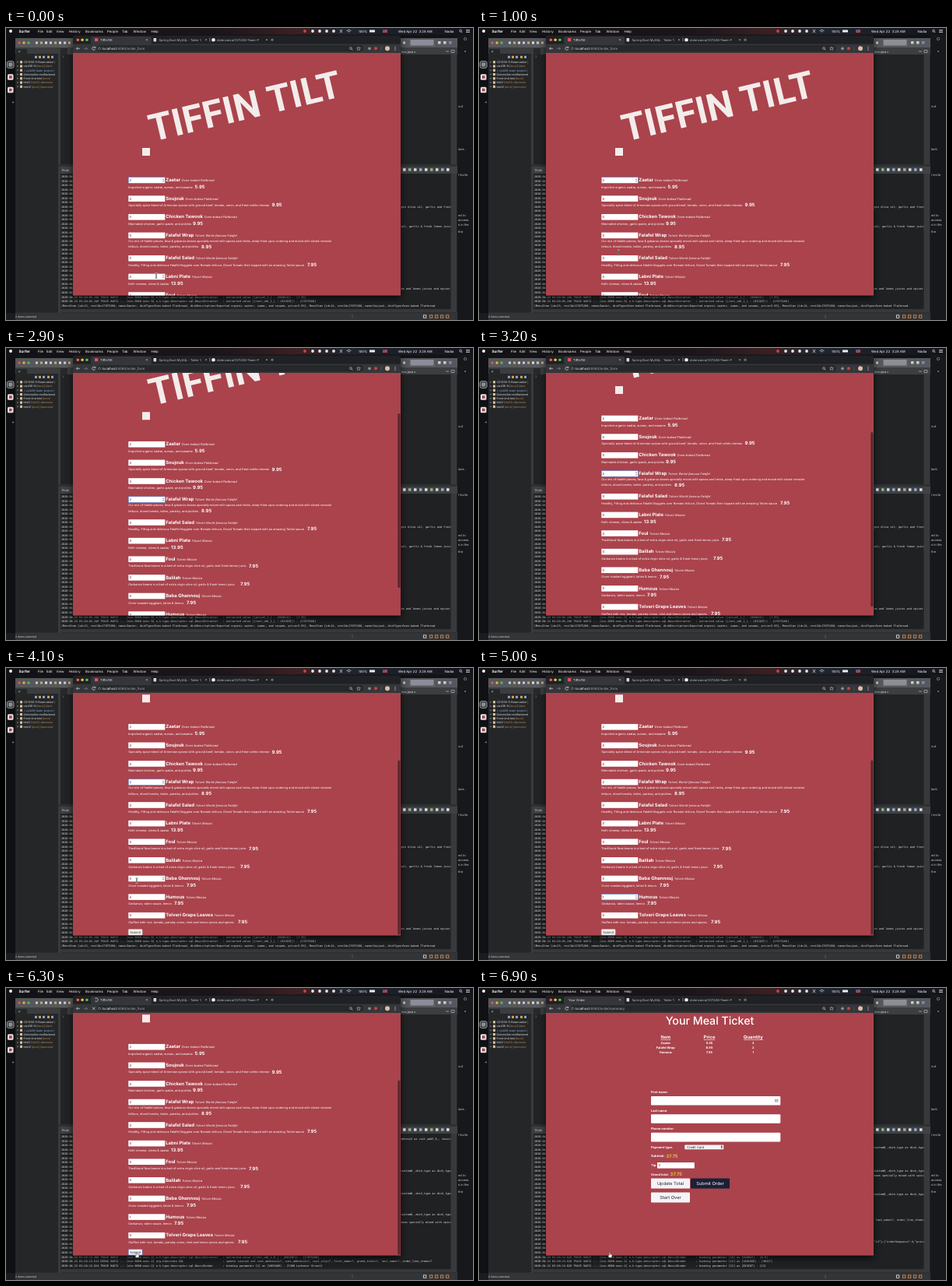
An HTML page that plays this animation: 600x375 px, repeating every 7000 ms.

```html
<!DOCTYPE html>
<html lang="en">
<head>
<meta charset="utf-8">
<title>Order form</title>
<style>
html, body { margin: 0; width: 100%; height: 100%; overflow: hidden; background: #0b0b0e; }
svg { display: block; width: 600px; height: 375px; font-family: Inter, "Open Sans", sans-serif; text-rendering: geometricPrecision; }
text { white-space: pre; }
.mono { font-family: "DejaVu Sans Mono", monospace; }
.logo { font-family: Roboto, sans-serif; font-weight: 600; }
.window { filter: drop-shadow(0 4px 5px rgba(0, 0, 0, .65)); }
</style>
</head>
<body>
<svg id="stage" viewBox="0 0 600 375" xmlns="http://www.w3.org/2000/svg"></svg>
<script>
const esc = s => String(s).replace(/&/g, '&amp;').replace(/</g, '&lt;');
const rect = (x, y, w, h, fill, more = '') => `<rect x="${x}" y="${y}" width="${w}" height="${h}" fill="${fill}" ${more}/>`;
const dot = (x, y, r, fill, more = '') => `<circle cx="${x}" cy="${y}" r="${r}" fill="${fill}" ${more}/>`;
const text = (x, y, s, size, fill = '#fff', more = '') => `<text x="${x}" y="${y}" font-size="${size}" fill="${fill}" ${more}>${esc(s)}</text>`;
const line = (d, color, w = 0.7) => `<path d="${d}" fill="none" stroke="${color}" stroke-width="${w}"/>`;
const group = (id, body, more = '') => `<g id="${id}" ${more}>${body}</g>`;
const bold = 'font-weight="700"';
const mid = 'text-anchor="middle"';
const RED = '#aa434c';

// name, kind, description, price, price x
const FLAT = 'Oven-baked Flatbread', WORLD = 'Tolveri World-famous Falafel', MEZZA = 'Tolveri Mezza';
const dishes = [
  ['Zaatar', FLAT, 'Imported organic zaatar, sumac, and sesame', '5.95', 242.5],
  ['Soujouk', FLAT, 'Specialty spice blend of Armenian spices with ground beef, tomato, onion, and fresh white cheese', '9.95', 341.5],
  ['Chicken Tawook', FLAT, 'Marinated chicken, garlic paste, and pickles', '9.95', 240],
  ['Falafel Wrap', WORLD, 'lettuce, diced tomato, tahini, parsley, and pickles.', '8.95', 251],
  ['Falafel Salad', WORLD, 'Healthy, Filling and delicious Falafel Nuggets over Romain lettuce, Diced Tomato then topped with an amazing Tahini sauce', '7.95', 387],
  ['Labni Plate', MEZZA, 'Kefir cheese, olives & zaatar.', '13.95', 212],
  ['Foul', MEZZA, 'Traditional fava beans in a bed of extra virgin olive oil, garlic and fresh lemon juice.', '7.95', 312],
  ['Balilah', MEZZA, 'Garbanzo beans in a bed of extra virgin olive oil, garlic & fresh lemon juice.', '7.95', 301],
  ['Baba Ghannouj', MEZZA, 'Oven-roasted eggplant, tahini & lemon.', '7.95', 232],
  ['Humous', MEZZA, 'Garbanzo, tahini sauce, lemon.', '7.95', 216],
  ['Tolveri Grape Leaves', MEZZA, 'Stuffed with rice, tomato, parsley onion, mint and lemon juices and spices.', '7.95', 298]
];
const WRAP = 3, HUMOUS = 9;
const longLine = 'Our mix of falafel pieces, fava & gabanzo beans specially mixed with spices and herbs, deep-fried upon ordering and mixed with sliced romaine';
const dishY = i => 195.2 + i * 23.62 + (i > WRAP ? 5.8 : 0);

function dish([name, kind, desc, price, px], i) {
  const y = dishY(i), dy = y + (i === WRAP ? 16.4 : 10.4);
  return rect(157.3, y - 3.5, 47, 7.6, '#fff', `id="box${i}" stroke-width=".6"`) +
    rect(158.2, y - 2.4, 3.2, 5.2, '#a9c8f2', `id="sel${i}"`) +
    text(158.4, y + 1.9, 0, 4.2, '#333', `id="val${i}"`) +
    `<path id="spin${i}" d="M201 ${y - 0.5}l1-1.5l1 1.5zM201 ${y + 1.1}l1 1.5l1-1.5z" fill="#666"/>` +
    `<text x="205.2" y="${y + 2}" font-size="5.95" fill="#fff" ${bold}>${name}<tspan dx="1.5" font-size="3.95" font-weight="400" font-style="italic">${kind}</tspan></text>` +
    (i === WRAP ? text(157.3, y + 8.7, longLine, 3.85) : '') +
    text(157.3, dy, desc, 3.9) + text(px, dy + 0.2, price, 5.9, '#fff', bold);
}

function menuPage() {
  return rect(175, 154, 10, 10, '#f3ecea') +
    text(0, 0, 'TIFFIN TILT', 48.5, '#f3ecea', 'class="logo" transform="translate(188 146) rotate(-13.4)"') +
    dishes.map(dish).join('') +
    rect(157.3, 455.4, 17.8, 7.4, '#f5f5f5', 'id="submit" rx="1" stroke-width=".7"') +
    text(166.2, 460.7, 'Submit', 4.2, '#222', mid);
}

function ticketPage() {
  const cols = [239.8, 296, 352.3];
  const row = (cells, y, size, more = '') => cells.map((c, i) => text(cols[i], y, c, size, '#fff', `${bold} ${mid} ${more}`)).join('');
  const label = (s, y) => text(221, y, s, 4, '#fff', bold);
  const field = (s, y) => label(s, y) + rect(221, y + 3.6, 166.3, 11.6, '#fff', 'rx="1"');
  const button = (x, y, s, bg, fg) => rect(x, y, 50, 13, bg, 'rx="1"') + text(x + 25, y + 8.5, s, 5.7, fg, mid);
  return text(296.5, 47, 'Your Meal Ticket', 14.2, '#fff', `font-weight="500" ${mid}`) +
    row(['Item', 'Price', 'Quantity'], 65.2, 5.9, 'text-decoration="underline"') +
    row(['Zaatar', '5.95', '2'], 72, 3.95) +
    row(['Falafel Wrap', '8.95', '2'], 77.8, 3.95) +
    row(['Humous', '7.95', '1'], 83.5, 3.95) +
    field('First name:', 135.3) + field('Last name:', 158.6) + field('Phone number:', 182.2) +
    rect(380, 142.8, 4.4, 3.6, '#a8a8ac', 'rx=".5"') + line('M381 144h2.4M381 145.3h2.4', '#fff', 0.4) +
    label('Payment type:', 205.6) + rect(264.3, 201.4, 50, 5.8, '#f4f4f4', 'rx=".8"') +
    text(267, 205.7, 'Credit Card', 4.1, '#222') +
    '<path d="M310.6 203.8l1.2-1.7l1.2 1.7zM310.6 204.6l1.2 1.7l1.2-1.7z" fill="#333"/>' +
    label('Subtotal:', 217.2) + text(240.2, 217.8, '37.75', 5.9, '#e7c936', bold) +
    label('Tip:', 229.2) + rect(229, 224, 47.8, 7.6, '#fff') + text(230.5, 229.4, '0', 4.2, '#333') +
    label('Grand total:', 240.8) + text(245.6, 241.4, '37.75', 5.9, '#e7c936', bold) +
    button(221, 244.5, 'Update Total', '#f4f4f6', '#22242c') +
    button(272, 244.5, 'Submit Order', '#1b2036', '#fff') +
    button(221, 262.5, 'Start Over', '#f4f4f6', '#22242c');
}

// three console states: stamped bottom lines and the tails of long lines at right
const log = (time, level, exec, cls, msg) => `2020-04-22 03:${time} ${level} 94672 --- [nio-8080-exec-${exec}] ${cls.padEnd(40)} : ${msg}`;
const SQL = 'o.h.type.descriptor.sql.Basic';
const tail = 'nuitem0_.dish_type as dish_type4_0_';
const consoles = [
  { last: [
      log('20:05.246', 'TRACE', 9, SQL + 'Extractor', 'extracted value ([price5_1_] : [DOUBLE]) - [7.95]'),
      log('20:05.246', 'TRACE', 9, SQL + 'Extractor', 'extracted value ([rest_id6_1_] : [BIGINT]) - [17075260]'),
      '[MenuItem [id=13, restId=17075260, name=Zaatar, dishType=Oven-baked Flatbread, dishDescription=Imported organic zaatar, sumac, and sesame, price=5.95], MenuItem [id=14, restId=17075260, name=Soujouk, dishType=Oven-baked Flatbread'],
    tails: [[230, 'gin olive oil, garlic and fresh lemon'], [255, 'oil, garlic & fresh lemon juice.'], [335, 'on and lemon juices and spices.']] },
  { last: [
      log('28:13.266', 'TRACE', 2, SQL + 'Extractor', 'extracted value ([rest_id6_1_0_] : [BIGINT]) - [17075260]'),
      log('28:13.613', 'DEBUG', 2, 'org.hibernate.SQL', 'update session set cust_address1=?, cust_address2=?, cust_city=?, first_name=?, grand_total=?, last_name=?, order_line_items=?'),
      log('28:13.624', 'TRACE', 2, SQL + 'Binder', 'binding parameter [1] as [VARCHAR] - [5300 Larkmoor Street]')],
    tails: [[194, 'ddress2 as cust_add3_0_, sessio'], [235, tail], [264, tail], [291, tail], [301, 'eans specially mixed with spices']] },
  { last: [
      log('28:13.626', 'TRACE', 2, SQL + 'Binder', 'binding parameter [10] as [DOUBLE] - [0.0]'),
      log('28:13.626', 'TRACE', 2, SQL + 'Binder', 'binding parameter [12] as [VARCHAR] - [40417]'),
      log('28:13.626', 'TRACE', 2, SQL + 'Binder', 'binding parameter [13] as [BIGINT] - [12]')],
    tails: [[205, tail], [235, tail], [241, 'eans specially mixed with spices'], [265, tail], [298, ' last_name=?, order_line_items=?'], [326, '"i3"},{"orderSequence":4,"price']] }
];
const mono = (x, y, s) => text(x, y, s, 3.49, '#e4e4e4', 'class="mono"');
const consoleText = ({ last, tails }) => last.map((s, i) => mono(71, 346.6 + i * 5.5, s)).join('') +
  tails.map(([y, s]) => mono(507.5, y + 1, s)).join('');

function desktop() {
  let s = rect(0, 0, 600, 375, '#121316') + rect(0, 9, 12, 366, '#101114') + rect(580, 9, 20, 366, '#17181b');
  // chat window edges
  s += rect(1.5, 42.8, 8.5, 8.5, 'none', 'rx="2" stroke="#ddd" stroke-width=".8"') + rect(3, 44.3, 5.5, 5.5, '#8b8d92', 'rx="1"');
  [63, 79.5].forEach(y => s += rect(2, y - 3.7, 7.5, 7.5, '#e6e2e2', 'rx="1.5"') + rect(4, y - 1.8, 3.6, 3.6, '#a8444e'));
  s += text(9, 97, '+', 6, '#aaa', mid);
  [[102, 'out'], [157, 'lack.'], [190, 'l invite'], [242, 'ed to'], [248, 'access'], [254, 's in the'], [263, 'the']]
    .forEach(([y, w]) => s += text(581, y, w, 4, '#c9cacc'));
  s += dot(590, 14, 1.6, 'none', 'stroke="#aaa" stroke-width=".6"') + line('M589 29l2 2m0-2l-2 2', '#999', 0.6);
  // editor window
  s += rect(12, 13, 568, 362, '#2c2d2f', 'rx="2"') + rect(12, 13, 568, 12, '#56585b') + rect(12, 25, 568, 9, '#3b3d40');
  ['#e2574c', '#e5b33d', '#5cb657'].forEach((c, i) => s += dot(17 + i * 6, 19, 1.7, c));
  for (let i = 0; i < 8; i++) s += rect(38 + i * 6, 17.5, 3, 3, ['#c3ced9', '#c4ad70', '#dddddd'][i % 3]);
  s += rect(510, 17.5, 3, 3, '#c2c5c8') + rect(519.5, 15, 30, 7.5, '#8b8e98');
  [555, 562, 569].forEach((x, i) => s += rect(x, 17, 3.5, 3.5, i === 2 ? '#6b8fc0' : '#c8cacd'));
  s += rect(12, 26, 55, 339, '#252628') + rect(12, 26, 55, 7, '#3a3c3e') + rect(13, 27, 14, 6, '#252628') + text(16, 31.5, 'P', 4, '#ccc');
  [37, 42, 47, 53, 58].forEach((x, i) => s += rect(x, 35.8, 3, 3, i % 2 ? '#d0a54b' : '#90a8c4'));
  ['CST438-3-Reservation [', 'cst438-3t [boot] [devt', '> cst438-team-project [', 'DeliveryServiceBackend', 'Front-end test [boot]', 'hib01 [hib01] [devtools', 'hib02 [boot] [devtools]']
    .forEach((w, i) => {
      const y = 43.8 + i * 5.25, cut = w.indexOf('[');
      const name = cut < 0 ? w : w.slice(0, cut), note = cut < 0 ? '' : w.slice(cut);
      s += `<path d="M14.5 ${y - 1}l1.5 1l-1.5 1z" fill="#aaa"/>` + rect(18, y - 1.6, 3, 3.2, '#d8c296') +
        `<text x="22.5" y="${y + 1.2}" font-size="3.5" fill="${i === 2 ? '#82aee0' : '#e2e2e2'}">${esc(name)}<tspan fill="#b98a50">${note}</tspan></text>`;
    });
  s += rect(67, 26, 3, 340, '#3a3b3d') + rect(70, 26, 510, 149, '#222325') + rect(70, 26, 510, 8, '#3c3e41') + rect(70, 26, 9, 8, '#27292c');
  s += text(508, 31.6, 'tion.java ×', 3.8, '#ddd') + text(72, 38, '1', 3.5, '#888', 'class="mono"') + line('M565 30h4M572 28.5h4v3h-4z', '#ccc', 0.6);
  s += rect(67, 175, 513, 3, '#2f3032') + rect(70, 178, 510, 9, '#3f4143') + text(72, 184, 'Probl', 3.6, '#ddd');
  for (let i = 0; i < 9; i++) s += rect(510 + i * 7, 180.2, 3.5, 3.5, ['#dde0e4', '#8fb58b', '#d5d8dc', '#8fabd0'][i % 4]);
  s += rect(70, 187, 510, 178, '#202123');
  for (let y = 192; y < 345; y += 5.5) s += mono(71, y.toFixed(1), '2020-04-22');
  s += '<clipPath id="logClip"><rect x="70" y="187" width="509" height="178"/></clipPath>' +
    '<g clip-path="url(#logClip)">' + consoles.map((c, i) => group('log' + i, consoleText(c))).join('') + '</g>';
  s += rect(571.5, 34, 7.5, 141, '#38393b') + rect(571.5, 187, 7.5, 178, '#38393b') + rect(70, 361, 502, 4, '#37383a');
  s += rect(12, 366, 568, 9, '#333436') + rect(0, 366, 12, 9, '#1b1c1f') + text(12, 371.6, '0 items selected', 3.5, '#d0d0d0');
  s += line('M445 368v5', '#777', 0.5);
  [538, 546, 553, 560, 567].forEach((x, i) => s += rect(x - 1.6, 368.8, 3.4, 3.4, 'none', `stroke="${i ? '#d08a52' : '#d8d8d8'}" stroke-width=".9"`));
  return s;
}

function menuBar() {
  const stops = [[0, '#141116'], [0.45, '#1a1519'], [0.62, '#3a2024'], [0.72, '#20262f'], [1, '#13141a']];
  let s = '<linearGradient id="sky">' + stops.map(([o, c]) => `<stop offset="${o}" stop-color="${c}"/>`).join('') + '</linearGradient>';
  s += rect(0, 0, 600, 8.5, 'url(#sky)') + dot(6, 4, 2, '#f2f2f2');
  s += text(16.5, 5.5, 'Surfer', 4.7, '#fff', bold);
  [[41, 'File'], [52, 'Edit'], [64.5, 'View'], [81, 'History'], [102, 'Bookmarks'], [130, 'People'], [149, 'Tab'], [163.5, 'Window'], [186.5, 'Help']]
    .forEach(([x, w]) => s += text(x, 5.5, w, 4.3));
  [384, 394, 403, 412, 421].forEach((x, i) => s += dot(x, 4, 1.9, i ? '#e6e6e6' : '#d8413c'));
  s += line('M429 2l3 4M432 2l-3 4', '#eee') + line('M437.5 3.5q3-2.5 6 0M439 5q1.5-1.2 3 0', '#eee');
  s += text(453, 5.5, '100%', 4.2) + rect(467, 2.4, 7, 3.2, '#eee', 'rx=".6"') + rect(484, 2, 6, 4, '#b3404b') + rect(484, 2, 2.5, 2, '#3f548e');
  s += text(504, 5.5, 'Wed Apr 22  3:28 AM', 4.3) + text(563.5, 5.5, 'Nadia', 4.3);
  s += dot(584, 3.6, 1.4, 'none', 'stroke="#fff" stroke-width=".6"') + line('M585 4.6l1.3 1.4M591 2.5h5M591 4h5M591 5.5h5', '#fff', 0.6);
  return s;
}

function browser() {
  let s = rect(86, 9.5, 421, 334, '#202124', 'rx="2" class="window"') + rect(109, 11, 78, 10, '#35363a', 'rx="2"') + rect(86, 20.5, 421, 11.5, '#35363a');
  ['#f0635a', '#f2bd42', '#58c251'].forEach((c, i) => s += dot(92.3 + i * 5.8, 15.2, 1.8, c));
  s += rect(114, 13, 4.2, 4.2, '#d4545f', 'id="icon"') + '<path id="wheel" d="M0-2.2a2.2 2.2 0 1 1-2.2 2.2" fill="none" stroke="#a9c4ee" stroke-width=".8"/>';
  s += text(121, 16.8, '', 4.1, '#eee', 'id="tab"');
  s += rect(189.5, 13, 3.6, 4.4, '#d8d8d8') + text(196.5, 16.8, "Spring Boot MySQL : Table 't", 4, '#bfc1c5');
  s += dot(266.5, 15.2, 2.3, '#eee') + text(271, 16.8, 'dolenvarca/CST438-Team-P', 4, '#bfc1c5');
  [181, 257, 335].forEach(x => s += line(`M${x - 1} 14.2l2 2m0-2l-2 2`, '#c2c4c8', 0.6));
  s += line('M262 12.5v5M340 15.2h4M342 13.2v4', '#b5b7ba', 0.6);
  s += line('M95 26.3h-4.5m1.8-1.8l-1.8 1.8l1.8 1.8', '#ddd') + line('M100 26.3h4.5m-1.8-1.8l1.8 1.8l-1.8 1.8', '#85878a');
  s += group('reload', line('M114.4 25a2 2 0 1 0 .2 2M114.8 23.8v1.6h-1.6', '#ddd')) + group('stop', line('M111 24.6l3.4 3.4m0-3.4l-3.4 3.4', '#ddd'));
  s += rect(117, 22, 342, 8.6, '#27282b', 'rx="4.3"') + dot(120, 26.3, 1.4, 'none', 'stroke="#bbb" stroke-width=".5"');
  s += `<text x="123.5" y="27.9" font-size="4.35" fill="#f0f0f0">localhost<tspan id="path" fill="#aeb0b4"></tspan></text>`;
  s += dot(443, 26, 1.4, 'none', 'stroke="#ccc" stroke-width=".6"') + line('M444 27l1.3 1.4', '#ccc');
  s += '<path d="M453 23.8l.7 1.7l1.8.1l-1.4 1.2l.5 1.8l-1.6-1l-1.6 1l.5-1.8l-1.4-1.2l1.8-.1z" fill="none" stroke="#ccc" stroke-width=".5"/>';
  s += dot(467, 26.3, 1.9, '#8a8c90') + dot(475, 26.3, 2, '#c64545') + line('M482 23.5v5.6', '#666', 0.5) + dot(490, 26.3, 3, '#d9c0a8');
  [24.3, 26.3, 28.3].forEach(y => s += dot(500, y, 0.6, '#ddd'));
  s += '<clipPath id="view"><rect x="86" y="32" width="421" height="311.5"/></clipPath><g clip-path="url(#view)">' +
    rect(86, 32, 421, 312, RED) + group('menu', menuPage()) + group('ticket', ticketPage()) +
    rect(503.4, 32, 3, 224, '#57272d', 'id="thumb" rx="1.5"') + '</g>';
  return s;
}

const beam = 'M-1.4-3.4q1.4 0 1.4 1v5q0 1-1.4 1M1.4-3.4q-1.4 0-1.4 1v5q0 1 1.4 1';
const cursors =
  group('beam', line(beam, '#fff', 1.1) + line(beam, '#222', 0.55)) +
  group('arrow', '<path d="M-1-3v6l1.4-1.2l1 2l1-.5l-1-1.9l1.8-.2z" fill="#111" stroke="#fff" stroke-width=".5"/>') +
  group('hand', '<path d="M-.8-3q.8-.8 1.4 0v2.2l2.2.5q.7 2-.4 4h-3l-2-2.6q.5-1 1.8 0z" fill="#fff" stroke="#222" stroke-width=".5"/>') +
  group('ring', dot(0, 0, 5, 'none', 'stroke="#3c6fc9" stroke-width=".8"'));

document.getElementById('stage').innerHTML = desktop() + browser() + menuBar() + group('mouse', cursors);
const el = {};
document.querySelectorAll('[id]').forEach(n => el[n.id] = n);
const show = (id, on) => el[id].setAttribute('visibility', on ? 'inherit' : 'hidden');
const set = (id, key, v) => el[id].setAttribute(key, v);

// eased interpolation through [time, value] points
function along(keys, t, k = 1) {
  if (t <= keys[0][0]) return keys[0][k];
  for (let i = 1; i < keys.length; i++) {
    const a = keys[i - 1], b = keys[i];
    if (t <= b[0]) {
      const p = (t - a[0]) / (b[0] - a[0]);
      return a[k] + (b[k] - a[k]) * p * p * (3 - 2 * p);
    }
  }
  return keys[keys.length - 1][k];
}
const scrolling = [[2400, 0], [3200, 105], [3700, 119.8], [5100, 119.8], [5300, 120.6], [5600, 120.6], [5800, 119.8]];
const mousePath = [[400, 193, 318], [1500, 169, 266], [3900, 169, 266], [4500, 165, 293], [5050, 165, 293], [5400, 152, 323], [5800, 168, 342.5]];

function draw(t) {
  const scroll = along(scrolling, t), mx = along(mousePath, t), my = along(mousePath, t, 2);
  const done = t >= 6600, loading = t >= 5900 && !done;
  const focus = t < 1700 ? 0 : t < 4600 ? WRAP : t < 5900 ? HUMOUS : -1;
  const seen = !(t >= 2300 && t < 3900) && !(t >= 4800 && t < 5100);
  const picked = t >= 1700 && t < 2300 ? WRAP : t >= 4600 && t < 4900 ? HUMOUS : -1;
  dishes.forEach((d, i) => {
    const over = seen && Math.abs(my + scroll - dishY(i)) < 4 && mx > 157 && mx < 204;
    const qty = i === 0 || (i === WRAP && t >= 2300) ? 2 : i === HUMOUS && t >= 4900 ? 1 : 0;
    el['val' + i].textContent = qty;
    set('box' + i, 'stroke', i === focus ? '#4f86d9' : 'none');
    show('spin' + i, !done && (i === focus || over));
    show('sel' + i, !done && i === picked);
  });
  set('submit', 'stroke', loading ? '#4f86d9' : '#b9b9b9');
  set('menu', 'transform', `translate(0 ${-scroll})`);
  show('menu', !done);
  show('ticket', done);
  set('thumb', 'y', 32 + scroll * 0.723);
  show('thumb', t >= 2400 && !done);
  show('icon', !loading && !done);
  show('wheel', loading);
  set('wheel', 'transform', `translate(116 15.2) rotate(${t * 0.45 % 360})`);
  show('reload', !loading);
  show('stop', loading);
  el.tab.textContent = done ? 'Your Order' : 'TiffinTilt';
  set('tab', 'x', done ? 115 : 121);
  el.path.textContent = done ? ':8080/order/summary' : ':8080/order_form';
  const state = t < 6000 ? 0 : t < 6500 ? 1 : 2;
  consoles.forEach((c, i) => show('log' + i, i === state));
  set('mouse', 'transform', `translate(${mx} ${my})`);
  show('mouse', seen);
  show('beam', t < 5200);
  show('arrow', t >= 5200 && t < 5700);
  show('hand', t >= 5700);
  show('ring', t >= 1700 && t < 2200);
}

const start = performance.now();
function tick() {
  const t = (performance.now() - start) % 7000;
  draw(Math.floor(t / 100) * 100);
  requestAnimationFrame(tick);
}
tick();
</script>
</body>
</html>
```
